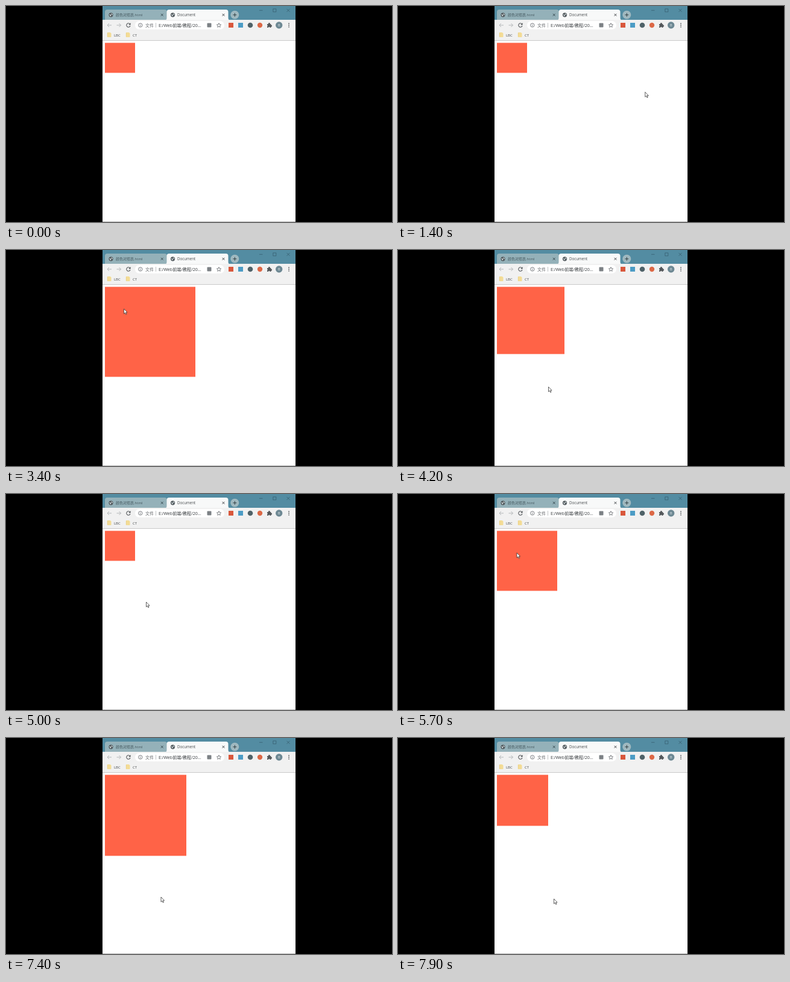
Animation, 640 px wide and 360 px high, one loop 8 s. Source, as an HTML page:

```html
<!DOCTYPE html>
<html lang="zh">
<head>
<meta charset="utf-8">
<title>Hover square</title>
<style>
  html, body { margin: 0; width: 100%; height: 100%; overflow: hidden; background: #000; }
  svg { display: block; width: 100vw; height: 100vh; }
  text { font-family: "Open Sans", "Noto Sans CJK SC", "Noto Sans CJK", sans-serif; }
  .line { fill: none; stroke-width: 1; }
</style>
</head>
<body>
<svg viewBox="0 0 640 360" xmlns="http://www.w3.org/2000/svg">
  <defs>
    <clipPath id="window"><rect x="160" width="320" height="360"/></clipPath>
    <g id="globe">
      <circle r="3.6" fill="#50585c"/>
      <path d="M-2.7-.9L-.6-.5L.4 .8L-.5 2.7L-1.5 1.1ZM.2-2.5L2.3-1.5L2.6 .5L1.1-.2Z" fill="#dfe6e8"/>
    </g>
    <path id="cross" d="M-1.9-1.9L1.9 1.9M1.9-1.9L-1.9 1.9" class="line"/>
    <g id="folder">
      <path d="M0 .8Q0 0 .8 0H4.6L6.5 1.6V7.2Q6.5 8 5.7 8H.8Q0 8 0 7.2Z" fill="#f3dc96"/>
      <path d="M.3 .7V7.4" stroke="#e5c678" stroke-width=".6"/>
    </g>
  </defs>
  <rect width="640" height="360"/>
  <g clip-path="url(#window)">
    <rect x="160" width="320" height="360" fill="#fff"/>
    <rect x="160" width="320" height="24" fill="#538ca2"/>

    <!-- tabs -->
    <path d="M164 23V10Q164 6 168 6H263Q267 6 267 10V23Z" fill="#94b1b9"/>
    <path d="M264 23.5Q266.5 23 266.5 20V10Q266.5 6 270.5 6H364.5Q368.5 6 368.5 10V20Q368.5 23 371 23.5Z" fill="#f8f9f9"/>
    <use href="#globe" x="174" y="14.8"/>
    <use href="#globe" x="276.5" y="14.8"/>
    <text x="182" y="17.1" font-size="6" fill="#45585f">颜色对照表.html</text>
    <text x="284" y="17.1" font-size="6.2" fill="#45494c">Document</text>
    <use href="#cross" x="258.7" y="14.8" stroke="#34474e"/>
    <use href="#cross" x="360.5" y="14.8" stroke="#3c4043"/>
    <circle cx="379.3" cy="14.8" r="7" fill="#a0b9c0"/>
    <path d="M376.3 14.8H382.3M379.3 11.8V17.8" class="line" stroke="#2f3c41"/>

    <!-- window controls -->
    <g class="line" stroke="#34596a" style="stroke-width:.7">
      <path d="M420 7.3H425.5M442.8 4.8H447.8V9.8H442.8ZM465.5 4.8L470.5 9.8M470.5 4.8L465.5 9.8"/>
    </g>

    <!-- toolbar -->
    <rect x="160" y="23" width="320" height="34.5" fill="#f1f1f1"/>
    <rect x="160" y="57" width="320" height="1" fill="#c9c9c9"/>
    <path d="M175 32H168M171 29L168 32L171 35M183.5 32H190.5M187.5 29L190.5 32L187.5 35" class="line" stroke="#b3b6b8"/>
    <path d="M205.6 30.2A3.2 3.2 0 1 0 206 33" class="line" stroke="#53575a" style="stroke-width:1.1"/>
    <path d="M206.6 28V31.4H203.2Z" fill="#53575a"/>
    <rect x="214" y="25" width="148" height="14" rx="7" fill="#fff"/>
    <circle cx="222.8" cy="32" r="3.2" class="line" stroke="#5f6368" style="stroke-width:.8"/>
    <path d="M222.8 31.5V34M222.8 29.9V30.7" class="line" stroke="#5f6368" style="stroke-width:.8"/>
    <text x="231" y="34.5" font-size="7" fill="#66696c">文件</text>
    <path d="M248.5 28V36" class="line" stroke="#a6a9ab" style="stroke-width:.7"/>
    <text x="253" y="34.5" font-size="7.1" fill="#33373a">E:/Web前端/教程/20...</text>
    <rect x="333.5" y="28.5" width="7" height="7" rx="1" fill="#7c8185"/>
    <path id="star" class="line" stroke="#5f6368" style="stroke-width:.8"/>

    <!-- extensions -->
    <rect x="369" y="28" width="8" height="8" fill="#d9573c"/>
    <rect x="385" y="28" width="8" height="8" fill="#4c9cc5"/>
    <circle cx="405" cy="32" r="4.3" fill="#4f6268"/>
    <circle cx="421" cy="32" r="4.2" fill="#dc6846"/>
    <path d="M433 30H435.1A1.4 1.4 0 1 1 437.7 30H439.4V31.9A1.3 1.3 0 1 1 439.4 34.4V36H437.5A1.2 1.2 0 0 0 435.1 36H433V34A1.2 1.2 0 0 0 433 31.8Z" fill="#53575a"/>
    <circle cx="452.7" cy="32" r="5.7" fill="#6d8893"/>
    <text x="452.7" y="34" font-size="5.4" fill="#e8eef0" text-anchor="middle">B</text>
    <g fill="#53575a">
      <circle cx="469" cy="29.2" r=".9"/><circle cx="469" cy="32" r=".9"/><circle cx="469" cy="34.8" r=".9"/>
    </g>

    <!-- bookmarks -->
    <use href="#folder" x="168" y="44"/>
    <use href="#folder" x="199" y="44"/>
    <text x="179" y="50.5" font-size="6" fill="#45494c">LBC</text>
    <text x="210" y="50.5" font-size="6" fill="#45494c">CT</text>

    <!-- page -->
    <rect id="square" x="164" y="61.4" fill="#ff6347"/>
    <rect x="160" y="359" width="320" height="1" fill="#b5b5b5"/>
    <path id="cursor" d="M0 0V8.2L1.9 6.5L3.2 9.4L4.5 8.8L3.2 6H5.6Z" fill="#fff" stroke="#222" stroke-width=".7" stroke-linejoin="round"/>
  </g>
</svg>
<script>
const LOOP = 8000, STEP = 100, GROW_TIME = 1000;
const SMALL = 50, LARGE = 150;
const hovers = [[1870, 3820], [5200, 7250]];

// time, x, y of the pointer tip
const pointerPath = [
  [1100, 474, 157], [1250, 474, 157], [1900, 195.5, 98], [3500, 195.5, 98],
  [3820, 238, 212], [4200, 249.5, 228], [4700, 247, 224], [5000, 232.5, 180],
  [5200, 209, 108], [5400, 197, 98], [6500, 197, 98], [7250, 243, 212],
  [7400, 257, 265], [7900, 258.5, 268]
];

const byId = id => document.getElementById(id);
const square = byId("square"), cursor = byId("cursor");
const clamp = v => Math.min(1, Math.max(0, v));
const mix = (a, b, k) => a + (b - a) * k;

function squareSize(t) {
  const grown = hovers.reduce((sum, [enter, leave]) =>
    sum + clamp((t - enter) / GROW_TIME) - clamp((t - leave) / GROW_TIME), 0);
  return mix(SMALL, LARGE, grown);
}

function pointerAt(t) {
  const next = pointerPath.findIndex(p => p[0] > t);
  if (next < 0) return pointerPath[pointerPath.length - 1].slice(1);
  if (next === 0) return null;
  const [t0, x0, y0] = pointerPath[next - 1], [t1, x1, y1] = pointerPath[next];
  const k = (t - t0) / (t1 - t0);
  return [mix(x0, x1, k), mix(y0, y1, k)];
}

function draw(t) {
  const size = squareSize(t), tip = pointerAt(t);
  square.setAttribute("width", size);
  square.setAttribute("height", size);
  cursor.setAttribute("visibility", tip ? "visible" : "hidden");
  if (tip) cursor.setAttribute("transform", `translate(${tip})`);
}

const starPoints = Array.from({ length: 10 }, (_, i) => {
  const r = i % 2 ? 1.7 : 3.8, a = (i * 36 - 90) * Math.PI / 180;
  return [353 + r * Math.cos(a), 32.3 + r * Math.sin(a)];
});
byId("star").setAttribute("d", "M" + starPoints.join("L") + "Z");

const start = performance.now();
function tick() {
  const t = (performance.now() - start) % LOOP;
  draw(Math.floor(t / STEP) * STEP);
  requestAnimationFrame(tick);
}
draw(0);
requestAnimationFrame(tick);
</script>
</body>
</html>
```
